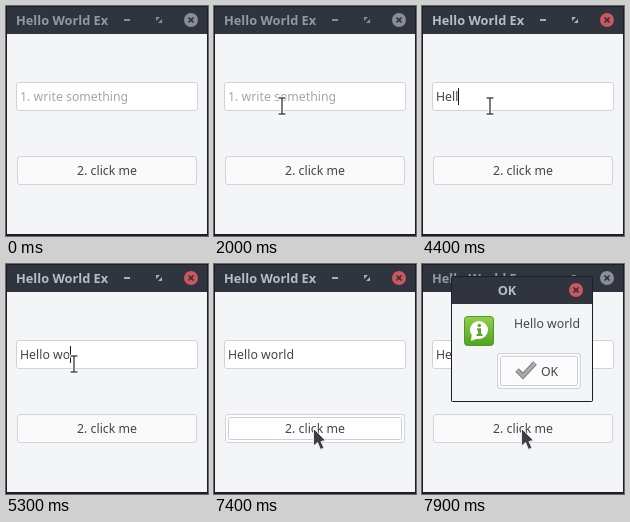
Recreate the animation shown at these times as an HTML page with a canvas. Size 202 by 230 pixels, loop 8 s.

```html
<!DOCTYPE html>
<html lang="en">
<head>
<meta charset="utf-8">
<title>Hello World Example</title>
<style>
html, body { margin: 0; width: 100%; height: 100%; overflow: hidden; background: #1c1e25; }
canvas { display: block; }
</style>
</head>
<body>
<canvas id="stage" width="202" height="230"></canvas>
<script>
const ctx = document.getElementById('stage').getContext('2d');

const LOOP = 8000, STEP = 100;
const FONT = '"Noto Sans", "Open Sans", sans-serif';
const BODY = `12.3px ${FONT}`;
const BOLD = `bold 12.8px ${FONT}`;
const BAR = '#2f343f', EDGE = '#1c1e25', PANEL = '#f4f5f7';
const BORDER = '#cfd3e0', RING = '#c9cee0', INK = '#42454d';
const FOCUS_IN = 2600, PRESS = 7400, DIALOG = 7800;

const MESSAGE = 'Hello world';
const KEYS = [3700, 3900, 4100, 4300, 4500, 4700, 4900, 5200, 5400, 5600, 5900];

// Pointer path: time, x, y
const PATH = [
  [700, 1, 1], [900, 22, 33], [1100, 41, 62], [1200, 46, 70], [1300, 51, 76],
  [1400, 51, 76], [1500, 70, 105], [1700, 70, 105], [1800, 69, 103], [2000, 68, 100],
  [6000, 68, 100], [6300, 69, 106], [6500, 74, 118], [6700, 85, 138],
  [6800, 92, 148], [6900, 98, 161], [7000, 99, 164]
];

function text(str, x, y, color, font = BODY, align = 'left') {
  ctx.font = font;
  ctx.fillStyle = color;
  ctx.textAlign = align;
  ctx.fillText(str, x, y);
}

function rect(x, y, w, h, color) {
  ctx.fillStyle = color;
  ctx.fillRect(x, y, w, h);
}

function box(x, y, w, h, fill, stroke, r = 2.5) {
  ctx.beginPath();
  ctx.roundRect(x + 0.5, y + 0.5, w - 1, h - 1, r);
  if (fill) {
    ctx.fillStyle = fill;
    ctx.fill();
  }
  ctx.lineWidth = 1;
  ctx.strokeStyle = stroke;
  ctx.stroke();
}

function shape(points, fill) {
  ctx.beginPath();
  points.forEach(([x, y]) => ctx.lineTo(x, y));
  ctx.closePath();
  ctx.fillStyle = fill;
  ctx.fill();
}

function line(points, width, color) {
  ctx.beginPath();
  points.forEach(([x, y], i) => i ? ctx.lineTo(x, y) : ctx.moveTo(x, y));
  ctx.lineWidth = width;
  ctx.strokeStyle = color;
  ctx.stroke();
}

function disc(x, y, r, color) {
  ctx.beginPath();
  ctx.arc(x, y, r, 0, Math.PI * 2);
  ctx.fillStyle = color;
  ctx.fill();
}

function closeButton(x, y, active) {
  disc(x, y, 7, active ? '#cc575d' : '#8a8e97');
  line([[x - 2.5, y - 2.5], [x + 2.5, y + 2.5]], 1.7, BAR);
  line([[x + 2.5, y - 2.5], [x - 2.5, y + 2.5]], 1.7, BAR);
}

function titleBar(active) {
  rect(1, 1, 200, 27, BAR);
  ctx.save();
  ctx.beginPath();
  ctx.rect(9, 1, 94, 27);
  ctx.clip();
  text('Hello World Example', 10, 19, active ? '#b4bdca' : '#9398a2', BOLD);
  ctx.restore();

  const icon = active ? '#a9b1be' : '#8a8e97';
  rect(118, 13, 6, 2, icon);
  shape([[150, 11], [154, 11], [150, 15]], icon);
  shape([[156, 17], [152, 17], [156, 13]], icon);
  closeButton(185, 14, active);
}

function caretVisible(t) {
  if (t < FOCUS_IN || t >= PRESS) return false;
  const last = KEYS.filter(k => k <= t).pop() ?? FOCUS_IN;
  return (t - last) % 1000 < 500;
}

function entry(t) {
  const typed = MESSAGE.slice(0, KEYS.filter(k => k <= t).length);
  box(10, 76, 182, 29, '#fff', BORDER);
  if (typed) text(typed, 14, 95, INK);
  else text('1. write something', 14, 95, '#a3a6ab');
  if (caretVisible(t)) {
    ctx.font = BODY;
    rect(14 + Math.round(ctx.measureText(typed).width), 82, 1, 17, '#16181c');
  }
}

function button(t, pos) {
  const hover = pos && pos[1] >= 148 && t < DIALOG;
  box(11, 150, 180, 29, hover ? '#fff' : '#fafafb', BORDER);
  if (t >= PRESS && t < DIALOG) box(14, 153, 174, 23, null, RING, 1);
  text('2. click me', 101, 169, INK, BODY, 'center');
}

function infoIcon(x, y) {
  const g = ctx.createLinearGradient(0, y, 0, y + 30);
  g.addColorStop(0, '#93cf4c');
  g.addColorStop(1, '#4da31f');
  box(x, y, 30, 30, g, '#4f9a24', 3);
  disc(x + 15, y + 14, 9, '#fff');
  shape([[x + 8, y + 17], [x + 7, y + 25], [x + 15, y + 22]], '#fff');
  disc(x + 15.3, y + 9.5, 1.8, '#5aa92c');
  rect(x + 13, y + 12.5, 4, 2, '#5aa92c');
  rect(x + 14, y + 12.5, 3, 7, '#5aa92c');
  rect(x + 12.5, y + 18, 6, 2, '#5aa92c');
}

function dialog() {
  ctx.beginPath();
  ctx.roundRect(29, 12, 142, 126, 2);
  ctx.fillStyle = EDGE;
  ctx.fill();
  rect(30, 13, 140, 27, BAR);
  rect(30, 40, 140, 97, PANEL);
  text('OK', 85, 31, '#b4bdca', BOLD, 'center');
  closeButton(154, 26, true);

  infoIcon(42, 52);
  text(MESSAGE, 92, 64, INK);

  box(75, 89, 84, 36, '#fbfbfc', BORDER);
  box(78, 92, 78, 30, null, RING, 1);
  const tick = [[95, 106], [101, 112], [113, 99]];
  line(tick, 5, '#777b7f');
  line(tick, 3, '#a9acaf');
  text('OK', 119, 112, INK);
}

function pointerAt(t) {
  if (t < PATH[0][0]) return null;
  const i = PATH.findIndex(p => p[0] > t);
  if (i < 0) return PATH[PATH.length - 1].slice(1);
  const [t0, x0, y0] = PATH[i - 1], [t1, x1, y1] = PATH[i];
  const k = (t - t0) / (t1 - t0);
  return [Math.round(x0 + (x1 - x0) * k), Math.round(y0 + (y1 - y0) * k)];
}

function beam(x, y) {
  for (const [width, color] of [[3, '#fff'], [1.3, '#33363b']]) {
    const pad = width > 2 ? 1 : 0;
    line([[x, y - 8], [x, y + 8]], width, color);
    for (const dy of [-8, 8]) {
      line([[x - 3.5 - pad, y + dy], [x + 3.5 + pad, y + dy]], width, color);
    }
  }
}

function arrow(x, y) {
  const points = [[0, 0], [0, 17.5], [4, 14], [7, 21], [10.5, 19.5], [7.5, 13], [12, 12]]
    .map(([dx, dy]) => [x + dx + 0.5, y + dy + 0.5]);
  shape(points, '#3d3f43');
  ctx.lineWidth = 1;
  ctx.strokeStyle = '#e9eaec';
  ctx.stroke();
}

function pointer(pos) {
  if (!pos) return;
  const [x, y] = pos;
  const overEntry = y >= 76 && y < 105;
  if (overEntry) beam(x, y);
  else arrow(x, y);
}

function draw(t) {
  const pos = pointerAt(t);
  rect(0, 0, 202, 230, EDGE);
  rect(1, 28, 200, 200, PANEL);
  titleBar(t >= FOCUS_IN && t < DIALOG);
  entry(t);
  button(t, pos);
  if (t >= DIALOG) dialog();
  pointer(pos);
}

const start = performance.now();

function tick() {
  const t = (performance.now() - start) % LOOP;
  draw(Math.floor(t / STEP) * STEP);
  requestAnimationFrame(tick);
}

tick();
</script>
</body>
</html>
```
